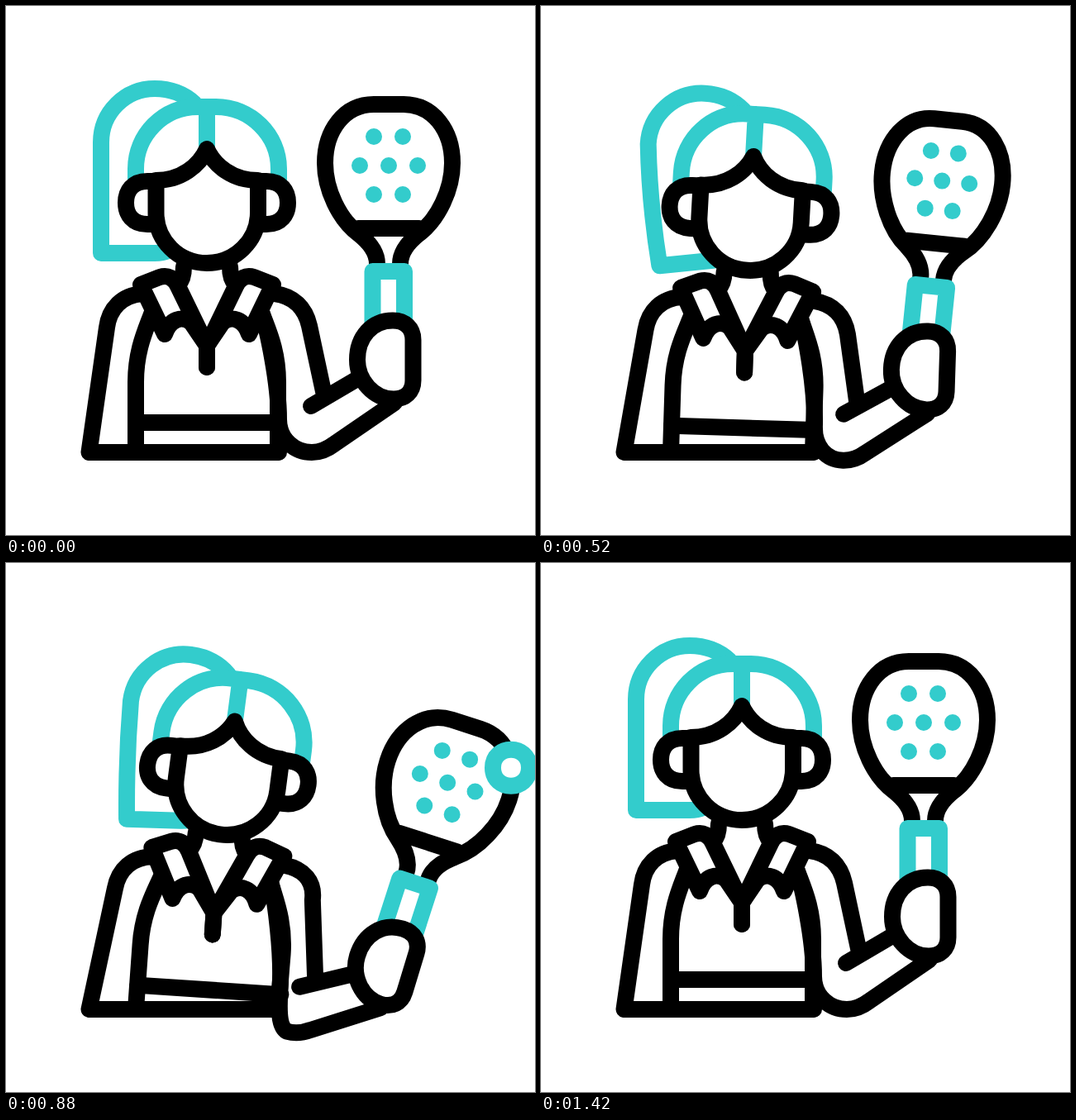
Animation of 640x640 px, one loop 1.66 s. Source, as an HTML page:

```html
<!DOCTYPE html>
<html lang="en">
<head>
<meta charset="utf-8">
<title>Padel player</title>
<style>
  html, body { margin: 0; height: 100%; overflow: hidden; background: #fff; }
  svg { display: block; width: 100vw; height: 100vh; stroke-width: 20; stroke-linecap: round; stroke-linejoin: round; }
</style>
</head>
<body>
<svg viewBox="0 0 640 640"></svg>
<script>
const LOOP = 1660, RAD = Math.PI / 180, TEAL = '#33cccc', BLACK = '#000';
const svg = document.querySelector('svg');

// Offsets from the rest pose: torso lean and bob, head shift and turn,
// elbow shift and forearm turn, grip shift, racket turn and racket squeeze.
const rest = Array(12).fill(0);
const low = [3.8, 12.5, 24, 18, 7.5, -14, 29, 17, 32, 67, 18, 0];
const poses = [
  [220, rest],
  [320, [2.15, 7, 13.5, 10.5, 4.5, -8, 15, 9.5, 18.5, 36, 9.9, 0]],
  [420, low],
  [520, [1.75, 6.5, 10, 9, 3.2, -3, 10, 2, 9.5, 18.5, 6, -.052]],
  [620, [-2.45, -5.5, -12.5, -8, -5, 10, -24, -19.5, -38, -47, -12.9, -.136]],
  [690, [-3.3, -7.5, -17, -11, -6.8, 13, -32, -26, -52, -70, -17.5, -.18]],
  [780, [-.5, 3.5, -1.5, 8.3, 1, -5, 5, 3.5, 8, 14.5, 4.5, -.025]],
  [870, low],
  [1000, [2.2, 7, 13.5, 10.5, 4.5, -6, 15, 9.5, 22, 37.5, 9.7, .01]],
  [1200, rest]
];
const tailSwing = [[220, 0], [320, -.045], [420, -.13], [520, -.155], [620, .11], [725, .35],
  [780, .23], [860, -.06], [930, -.15], [1000, -.135], [1290, .06], [1420, 0]];
const ballPath = [[520, 681, 326], [740, 470, 190], [960, 690, 280]];

// Monotone cubic through [time, value] keys, level at every extreme.
function smooth(keys, t) {
  const last = keys.length - 1;
  if (t <= keys[0][0]) return keys[0][1];
  if (t >= keys[last][0]) return keys[last][1];
  const i = keys.findIndex(k => k[0] > t) - 1;
  const rate = j => j < 0 || j >= last ? 0 : (keys[j + 1][1] - keys[j][1]) / (keys[j + 1][0] - keys[j][0]);
  const slope = j => {
    const a = rate(j - 1), b = rate(j);
    return a * b > 0 ? 2 * a * b / (a + b) : 0;
  };
  const [t0, v0] = keys[i], [t1, v1] = keys[i + 1], d = t1 - t0, u = (t - t0) / d, w = 1 - u;
  return v0 * w * w * (1 + 2 * u) + v1 * u * u * (3 - 2 * u) + d * u * w * (slope(i) * w - slope(i + 1) * u);
}
const tracks = rest.map((_, c) => poses.map(([t, v]) => [t, v[c]]));

let lean, bob, headX, headY, headTurn, elbowX, elbowY, armTurn, gripX, gripY, racketTurn, squeeze, swing, ballX, ballY;

const clamp = v => Math.max(0, Math.min(1, v));
function spin(x, y, cx, cy, angle, dx = 0, dy = 0) {
  const c = Math.cos(angle), s = Math.sin(angle);
  x -= cx; y -= cy;
  return [cx + dx + x * c - y * s, cy + dy + x * s + y * c];
}

const head = (x, y) => spin(x, y, 243, 250, headTurn * RAD, headX, headY);
const tail = (x, y) => head(...spin(x, y, 205, 165, swing * clamp((y - 165) / 134) ** .6));
const torso = (x, y) => {
  const a = lean * RAD;
  return [x + a * (540 - y), y + clamp((540 - y) / 36) * (bob + a * (x - 243))];
};
const forearm = (x, y) => spin(x, y, 369, 484, armTurn * RAD, elbowX, elbowY);
const outerArm = (x, y) => {
  if (y > 400) return forearm(x, y);
  const [px, py] = torso(x, y);
  return [px - (y > 380 ? .37 * armTurn : 0), py];
};
const innerArm = (x, y) => {
  if (y < 400) return torso(x, y);
  const [px, py] = forearm(x, y);
  return [Math.max(px, 330 + lean * RAD * Math.max(0, 540 - py)), py];
};
const racket = (x, y) => {
  const scale = 1 + squeeze * clamp((312 - y) / 40);
  return spin(463 + (x - 463) * scale, y, 463, 321, racketTurn * RAD, gripX, gripY);
};
const ball = (x, y) => [x + ballX, y + ballY];

const parts = [];
function part(warp, color, d, fill = 'none') {
  const el = document.createElementNS('http://www.w3.org/2000/svg', 'path');
  el.setAttribute('stroke', color);
  el.setAttribute('fill', fill);
  svg.append(el);
  parts.push({ el, warp, d });
}
// Draws a part and its reflection in the line x = 243.
function pair(warp, d, fill) {
  part(warp, BLACK, d, fill);
  part(warp, BLACK, d.replace(/([\d.]+),/g, (_, x) => 486 - x + ','), fill);
}

// Hair
part(tail, TEAL, 'M228,118 C215,106 199,100 180,100 C144,100 115,129 115,165 C115,210 115,254 115,299 L180,299 C192,299 200,296 205,288 L200,270');
part(head, TEAL, 'M157,212 L157,197 C157,156 190,122 232,122 L254,122 C296,122 330,156 330,197 L330,212 M243,122 L243,170');

// Torso
pair(torso, 'M215,315 C215,325 212,333 209,336');
pair(torso, 'M192,397 L163,337 L186,328 C196,325 203,329 208,339 L243,411 L243,437 M192,397 C198,379 213,374 224,383 L243,411');
pair(torso, 'M177,370 C170,390 157,415 157,455 L157,540');
part(torso, BLACK, 'M165,348 C140,350 125,366 122,389 L100.5,540 L330,540 M157,504 L330,504');

// Head
pair(head, 'M181.5,212 L171,212 C153,212 145,224 145,238 C145,252 153,264 171,264 L181.5,264', '#fff');
part(head, BLACK, 'M181.5,212 L181.5,250 C181.5,284 209,311 243,311 C277,311 305,284 305,250 L305,212', '#fff');
part(head, BLACK, 'M181,211 C212,211 234,193 243,173 C252,193 274,211 305,211', '#fff');

// Arm
part(outerArm, BLACK, 'M325,348 C348,351 362,365 367,387 L385,471 M369,484 L432,447');
part(innerArm, BLACK, 'M309,370 C316,390 330,455 330,500 C330,525 350,540 370,540 Q384,540 397,530 L470,480');

// Racket and hand
part(racket, BLACK, 'M449,312 C449,296 437,284 427,276 C403,258 386,222 386,190 C386,151 409,119 445,119 L481,119 C517,119 540,151 540,190 C540,222 523,258 499,276 C489,284 477,296 477,312', '#fff');
part(racket, BLACK, 'M426,269 L500,269');
const dots = [[445, 158], [480, 158], [428, 193], [463, 193], [498, 193], [445, 228], [480, 228]];
part(racket, TEAL, dots.map(p => `M${p} L${p}`).join(' '));
part(racket, TEAL, 'M443.5,390 L443.5,321 L482,321 L482,390', '#fff');
part(forearm, BLACK, 'M468,380.5 C483,380.5 492.5,390 492.5,404 L492.5,453 C492.5,467 483,475.5 469,475.5 C445,475.5 425,453 425,428 C425,400 443,380.5 468,380.5 Z', '#fff');

part(ball, TEAL, 'M-22,0 C-22,-29.3 22,-29.3 22,0 C22,29.3 -22,29.3 -22,0 Z', '#fff');

function draw(now) {
  const t = now % LOOP;
  [lean, bob, headX, headY, headTurn, elbowX, elbowY, armTurn, gripX, gripY, racketTurn, squeeze] =
    tracks.map(keys => smooth(keys, t));
  swing = smooth(tailSwing, t);
  const [from, to] = t < ballPath[1][0] ? ballPath : ballPath.slice(1);
  const u = clamp((t - from[0]) / (to[0] - from[0]));
  ballX = from[1] + (to[1] - from[1]) * u;
  ballY = from[2] + (to[2] - from[2]) * u;

  for (const { el, warp, d } of parts) {
    el.setAttribute('d', d.replace(/(-?[\d.]+),(-?[\d.]+)/g,
      (_, x, y) => warp(+x, +y).map(v => v.toFixed(2)).join()));
  }
  requestAnimationFrame(draw);
}
requestAnimationFrame(draw);
</script>
</body>
</html>
```
